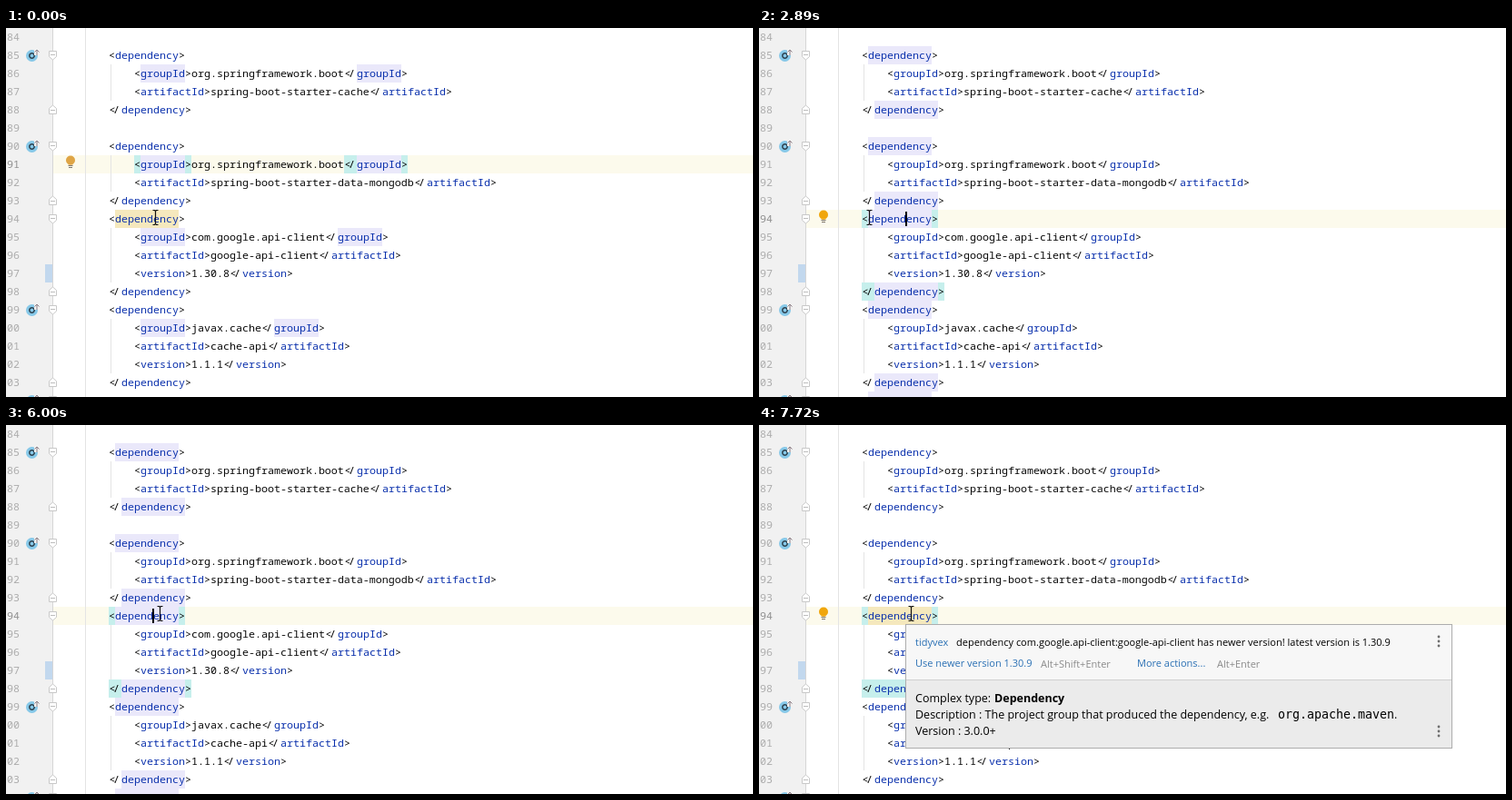
Recreate the animation shown at these times as an HTML page with a canvas. Size 822 by 406 pixels, loop 8 s.

```html
<!DOCTYPE html>
<html lang="en">
<head>
<meta charset="utf-8">
<title>Editor quick fix</title>
<style>
html, body { margin: 0; width: 100%; height: 100%; overflow: hidden; background: #fff; }
canvas { display: block; }
</style>
</head>
<body>
<canvas id="stage" width="822" height="406"></canvas>
<script>
const ctx = document.getElementById('stage').getContext('2d');
const LOOP = 8000, ROW = 20, CHAR = 7, LEFT = 113, FIRST = 84;
const CODE = '11.667px "Noto Sans Mono", monospace';
const ui = (size, weight = '') => `${weight} ${size}px "Open Sans", sans-serif`;
const LAVENDER = '#eae8fa', CYAN = '#c6efec', WARN = '#f5e8bd', LINK = '#2a70b4', GRAY = '#8b8b8b';

const lines = `
<dependency>
    <groupId>org.springframework.boot</groupId>
    <artifactId>spring-boot-starter-cache</artifactId>
</dependency>

<dependency>
    <groupId>org.springframework.boot</groupId>
    <artifactId>spring-boot-starter-data-mongodb</artifactId>
</dependency>
<dependency>
    <groupId>com.google.api-client</groupId>
    <artifactId>google-api-client</artifactId>
    <version>1.30.8</version>
</dependency>
<dependency>
    <groupId>javax.cache</groupId>
    <artifactId>cache-api</artifactId>
    <version>1.1.1</version>
</dependency>
<dependency>`.split('\n');

// Timelines: [start, value...], each value holds until the next start.
const pointerKeys = [
  [0, 164, 209], [2750, 156, 209], [2820, 139, 209], [2890, 121, 209], [2980, 107, 208],
  [3050, 96, 208], [3130, 85, 208, 1], [3210, 80, 208, 1], [3420, 77, 207, 1],
  [4610, 107, 208], [4670, 130, 207], [4750, 152, 207], [4840, 165, 207],
  [6000, 169, 208], [6080, 183, 211], [6160, 197, 214], [6240, 208, 216], [6320, 214, 217],
  [6470, 220, 219], [6730, 205, 215], [6800, 184, 211], [6870, 167, 208]];
const caretKeys = [
  [0, 0], [320, 162], [1350, 0], [1880, 162], [2430, 0], [2890, 162], [3420, 0],
  [5230, 162], [6550, 197], [7720, 0]];
const bulbKeys = [[0, 147], [320, 0], [1410, 207], [5230, 0], [6320, 207], [6550, 0], [7400, 207]];
const markKeys = [[0, 'group'], [790, 'tag'], [6870, 'warn']];

const at = (keys, t) => keys.filter(k => k[0] <= t).pop().slice(1);
const between = (t, a, b) => t >= a && t < b;
const rowTop = n => (n - FIRST) * ROW;

function box(x, y, w, h, fill, stroke) {
  ctx.fillStyle = fill;
  ctx.fillRect(x, y, w, h);
  if (stroke) {
    ctx.strokeStyle = stroke;
    ctx.lineWidth = 1;
    ctx.strokeRect(x + .5, y + .5, w - 1, h - 1);
  }
}

function text(s, x, y, font, color = '#000', align = 'left') {
  ctx.font = font;
  ctx.fillStyle = color;
  ctx.textAlign = align;
  ctx.fillText(s, x, y);
}

function poly(points, fill, stroke) {
  ctx.beginPath();
  points.forEach(([x, y]) => ctx.lineTo(x, y));
  ctx.closePath();
  ctx.fillStyle = fill;
  ctx.fill();
  if (stroke) {
    ctx.strokeStyle = stroke;
    ctx.lineWidth = 1;
    ctx.stroke();
  }
}

function disc(x, y, r, color) {
  ctx.fillStyle = color;
  ctx.beginPath();
  ctx.arc(x, y, r, 0, 7);
  ctx.fill();
}

function path(d, x, y, stroke, width = 1, fill) {
  const p = new Path2D(d);
  ctx.save();
  ctx.translate(x, y);
  if (fill) { ctx.fillStyle = fill; ctx.fill(p); }
  ctx.strokeStyle = stroke;
  ctx.lineWidth = width;
  ctx.stroke(p);
  ctx.restore();
}

function bulb(x, y, color) {
  disc(x, y - 1.5, 5, color);
  box(x - 2.5, y + 2, 5, 1.5, color);
  box(x - 2.5, y + 4, 5, 1, '#7d756a');
  box(x - 2, y + 6, 4, 1, '#7d756a');
}

function highlight(kind) {
  const cell = (n, col, len, color) => box(LEFT + col * CHAR, rowTop(n), len * CHAR, ROW, color);
  const word = { group: 'groupId', tag: 'dependency' }[kind];
  if (word) lines.forEach((line, i) => {
    for (const m of line.matchAll(new RegExp(`(?<=[</])${word}`, 'g')))
      cell(FIRST + i, m.index, word.length, LAVENDER);
  });
  if (kind === 'group') {
    [[4, 1], [12, 1], [37, 2], [46, 1]].forEach(([c, n]) => cell(91, c, n, CYAN));
  } else {
    cell(94, 0, 1, CYAN);
    cell(94, 11, 1, CYAN);
    cell(98, 0, 2, CYAN);
    cell(98, 12, 1, CYAN);
  }
  if (kind === 'warn') cell(98, 2, 10, CYAN);
  if (kind !== 'tag') cell(94, 1, 10, WARN);
}

function codeLine(line, y) {
  let open = false;
  for (const { 0: s, index } of line.matchAll(/<\/|[<>]|[^<>]+/g)) {
    const x = LEFT + index * CHAR;
    if (s === '</') {
      text('<', x + .5, y, CODE);
      text('/', x + 5, y, CODE);
    } else text(s, x, y, CODE, open ? '#0a30ac' : '#080808');
    open = s[0] === '<';
  }
}

function gutter(activeRow) {
  box(0, 0, 51, 406, '#f1f1f1');
  box(51, 0, 1, 406, '#d6d6d6');
  box(43, 260, 8, 20, '#c2d8ee');
  lines.forEach((line, i) => {
    const n = FIRST + i, y = rowTop(n) + 10;
    text(n, 15, y + 4, CODE, n === activeRow ? '#8f8f8f' : '#acacac', 'right');
    if (line.startsWith('</')) {
      poly([[47.5, y + 4.5], [47.5, y - 1.5], [51.5, y - 5], [55.5, y - 1.5], [55.5, y + 4.5]], '#fff', '#c8c8c8');
      box(49, y, 5, 1, '#bdbdbd');
    } else if (line[0] === '<') {
      poly([[47.5, y - 4.5], [55.5, y - 4.5], [55.5, y + 1.5], [51.5, y + 5], [47.5, y + 1.5]], '#fff', '#c8c8c8');
      box(49, y - 1, 5, 1, '#bdbdbd');
      if (n !== 94) {
        disc(28.5, y + .5, 6.5, '#86c8e8');
        path('M2.7 0A2.7 2.7 0 1 1-2.7 0A2.7 2.7 0 1 1 2.7 0', 28.5, y + .5, '#2f4350', 1.5);
        box(31, y - 7, 6, 7, '#f1f1f1');
        path('M0 5V-1M-2.5 1.5L0-1L2.5 1.5', 34, y - 5, '#8d7f86');
      }
    }
  });
}

function menu() {
  box(56, 220, 179, 85, '#fff', '#a5a5a5');
  box(57, 221, 177, 20, '#2874bd');
  bulb(72, 230, '#e6b557');
  box(57, 249, 177, 1, '#d4d4d4');
  box(57, 288, 177, 16, '#f2f2f2');
  [['Use newer version 1.30.9', 235, '#fff'], ['Insert namespace prefix', 262], ['Remove tag', 282]]
    .forEach(([s, y, color], i) => {
      text(s, 84, y, ui(11), color);
      poly([[218, y - 8], [224, y - 4], [218, y]], color || '#737373');
      if (i) {
        path('M0 0L7-7L9-5L2 2L-1 2ZM5-5L7-3', 69, y - 2, '#6e6e6e', 1, '#8a8a8a');
        path('M-2-8H4M-2-5H2', 69, y - 1, '#777');
      }
    });
  text('Press Ctrl+Shift+I to open preview', 62, 300, ui(9.45), GRAY);
}

function tooltip() {
  box(161, 219, 602, 137, '#ebebeb', '#adadad');
  box(162, 220, 600, 60, '#f7f7f7');
  box(162, 280, 600, 1, '#d0d0d0');
  text('tidyvex', 172, 243, ui(11), LINK);
  text('dependency com.google.api-client:google-api-client has newer version! latest version is 1.30.9', 217, 243, ui(11));
  text('Use newer version 1.30.9', 172, 266, ui(11), LINK);
  text('Alt+Shift+Enter', 310, 267, ui(11), GRAY);
  text('More actions...', 416, 266, ui(11), LINK);
  text('Alt+Enter', 504, 267, ui(11), GRAY);
  text('Complex type:', 172, 305, ui(12.5));
  text('Dependency', 259, 305, ui(12.5, 'bold'));
  text('Description : The project group that produced the dependency, e.g.', 172, 323, ui(12.5));
  text('org.apache.maven', 571, 323, '13.3px "DejaVu Sans Mono", monospace');
  text('.', 699, 323, ui(12.5));
  text('Version : 3.0.0+', 172, 341, ui(12.5));
  for (const y of [238, 337]) for (const d of [-5, 0, 5]) disc(748, y + d, 1.4, '#6e6e6e');
}

function pointer([x, y, arrow]) {
  if (arrow) path('M0 0V16L4 12.5L6.5 18L9 17L6.5 11.5H11.5Z', x + .5, y + .5, '#000', 1, '#fff');
  else path('M-3-8H-1L0-7L1-8H3M0-7V7M-3 8H-1L0 7L1 8H3', x + .5, y - .5, '#111', 1.2);
}

function draw(t) {
  const activeRow = t < 320 ? 91 : 94;
  const [caret] = at(caretKeys, t), [bulbY] = at(bulbKeys, t);
  box(0, 0, 822, 406, '#fff');
  box(52, rowTop(activeRow), 770, ROW, '#fcfaec');
  box(87, 0, 1, 406, '#e4e4e4');
  lines.forEach((line, i) => {
    if (line[0] === ' ') box(115, i * ROW, 1, ROW, '#e4e4e4');
  });
  highlight(at(markKeys, t)[0]);
  lines.forEach((line, i) => codeLine(line, i * ROW + 14));
  gutter(activeRow);

  if (caret) box(caret - 1, 202, 2, 16, '#000');
  if (between(t, 3210, 5230)) {
    box(57, 193, 44, 28, '#fff', '#c4c4c4');
    poly([[83, 205], [92, 205], [87.5, 210]], '#6e6e6e');
  }
  if (bulbY) bulb(71, bulbY, t < 320 ? '#dfa545' : '#f0a60c');
  if (between(t, 3740, 5230)) menu();
  if (t >= 7400) tooltip();
  pointer(at(pointerKeys, t));
}

const start = performance.now();
function tick() {
  draw(Math.max(0, performance.now() - start) % LOOP);
  requestAnimationFrame(tick);
}
tick();
</script>
</body>
</html>
```
